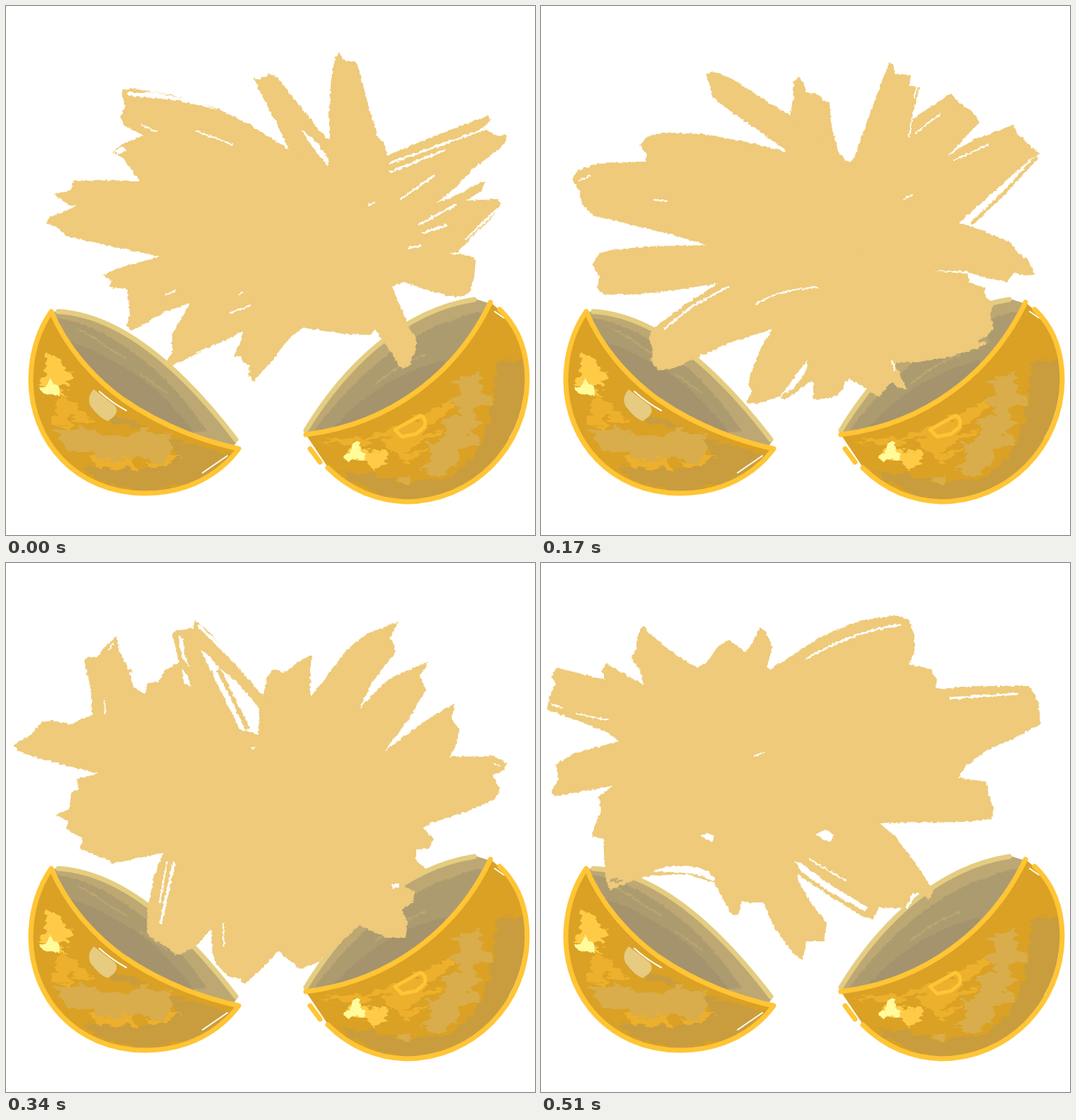
An HTML page for the animation above (0.68 s loop, 748 by 748 pixels).

```html
<!DOCTYPE html>
<html lang="en">
<head>
<meta charset="utf-8">
<title>Splash between two bowls</title>
<style>
html, body { margin: 0; width: 100%; height: 100%; overflow: hidden; background: #fff; }
svg { display: block; width: 100%; height: 100%; }
.line { fill: none; stroke: #ffc535; stroke-width: 7; stroke-linecap: round; stroke-linejoin: round; }
.back { stroke: #e4cd80; }
.thin { stroke-width: 5; }
.gold { fill: #daa124; } .dusk { fill: #c99d3e; } .tan { fill: #d9ad4b; }
.amber { fill: #edb02c; } .glow { fill: #ffcb47; } .spark { fill: #fffb9b; }
.in1 { fill: #bda873; } .in2 { fill: #ad9b70; } .in3 { fill: #a4936d; }
.ink { fill: #eeca7a; } .gap { fill: none; stroke: #fff; stroke-linecap: round; }
.hole { fill: #fff; }
</style>
</head>
<body>
<svg viewBox="0 0 748 748">
<defs>
  <filter id="rough" filterUnits="userSpaceOnUse" x="0" y="0" width="748" height="748" color-interpolation-filters="sRGB">
    <feTurbulence type="fractalNoise" baseFrequency=".2" numOctaves="2" seed="4"/>
    <feDisplacementMap in="SourceGraphic" scale="5" xChannelSelector="R" yChannelSelector="G"/>
  </filter>
  <filter id="streaky" filterUnits="userSpaceOnUse" x="0" y="0" width="748" height="748" color-interpolation-filters="sRGB">
    <feTurbulence type="fractalNoise" baseFrequency=".05 .12" numOctaves="3" seed="9"/>
    <feDisplacementMap in="SourceGraphic" scale="20" xChannelSelector="R" yChannelSelector="G"/>
  </filter>
  <path id="shapeL" d="M64 432C84 480 121 524 165 556C213 589 270 613 329 626C304 660 258 690 195 689C100 688 36 617 35 530C35 490 47 456 64 432Z"/>
  <path id="shapeR" d="M424 606C540 592 636 522 685 419L698 430C724 454 737 487 737 529C736 624 660 701 565 701C525 700 486 684 455 652Z"/>
  <path id="innerL" d="M68 432C158 437 246 512 327 615L320 625C210 606 110 555 68 432Z"/>
  <path id="innerR" d="M422 604C478 511 562 428 663 414L682 420C645 525 555 604 422 606Z"/>
  <clipPath id="bodyL"><use href="#shapeL"/></clipPath>
  <clipPath id="bodyR"><use href="#shapeR"/></clipPath>
  <clipPath id="cupL"><use href="#innerL"/></clipPath>
  <clipPath id="cupR"><use href="#innerR"/></clipPath>
</defs>

<use href="#innerL" class="in1"/>
<g clip-path="url(#cupL)"><g filter="url(#rough)">
  <path class="in2" d="M68 440C150 452 230 520 284 601L230 605L120 560Z"/>
  <path class="in3" d="M80 471C105 480 125 486 145 499C190 520 231 555 266 604L200 599L110 530Z"/>
  <path d="M101 456C130 470 146 487 171 499M190 520L228 548" fill="none" stroke="#bda873" stroke-width="2"/>
</g></g>
<path class="line back" d="M74 432C160 437 244 507 325 613"/>

<use href="#shapeL" class="gold"/>
<g clip-path="url(#bodyL)"><g filter="url(#streaky)">
  <path class="dusk" d="M118 565L175 585L235 612L315 632L290 665L200 688L130 672L110 650L190 653L245 637L215 600L150 590Z"/>
  <path class="amber" d="M75 550L105 567L125 590L85 580L98 602L65 590ZM120 636L172 630L185 655L130 654ZM195 646L250 632L215 656Z"/>
  <path class="tan" d="M68 601L110 596L135 608L180 604L190 598L232 606L236 626L222 646L184 638L148 645L120 629L88 627Z"/>
  <path class="glow" d="M57 492L72 490L82 513L95 520L90 537L75 535L88 554L68 548L45 535L55 520Z"/>
</g>
<path class="spark" filter="url(#rough)" d="M62 526L68 535L75 537L76 552L65 549L53 548L47 540L57 538Z"/>
<path d="M124 542L154 565Q160 573 152 581L144 587Q132 583 119 565Q114 553 124 542Z" fill="#e6cb80"/>
<path class="gap" stroke-width="2" d="M132 545Q150 561 170 572M40 561Q47 595 66 622M278 660L313 636"/>
</g>
<use href="#shapeL" class="line"/>

<use href="#innerR" class="in1"/>
<g clip-path="url(#cupR)"><g filter="url(#rough)">
  <path class="in2" d="M435 601C490 528 567 453 675 431L650 500L560 585Z"/>
  <path class="in3" d="M460 601C490 562 545 520 622 500L600 550L530 595Z"/>
  <path d="M522 535C545 515 570 502 593 493M625 447L655 433" fill="none" stroke="#bda873" stroke-width="2"/>
</g></g>
<path class="line back" d="M424 600C478 511 560 431 662 415"/>

<use href="#shapeR" class="gold"/>
<g clip-path="url(#bodyR)"><g filter="url(#streaky)">
  <path class="dusk" d="M694 505L740 498L735 590L680 670L610 705L535 697L465 655L515 661L560 675L620 670L661 640L685 580Z"/>
  <path class="amber" d="M438 616L520 607L560 592L550 607L485 620ZM575 585L635 556L620 580L585 604L622 598L560 633L602 622L565 645L530 620Z"/>
  <path class="tan" d="M632 529L672 516L670 540L688 560L660 570L672 590L655 600L670 618L640 630L642 647L610 668L585 650L605 638L594 620L628 604L615 590L646 570L625 560L648 547ZM550 668L574 665L568 677Z"/>
  <path class="glow" d="M478 638L492 623L512 628L542 632L535 646L524 657L509 648Z"/>
</g>
<path class="spark" filter="url(#rough)" d="M491 617L500 616L501 628L509 635L506 642L491 640L483 646L477 637L487 630Z"/>
<path class="gap" stroke-width="2" d="M691 432L704 441M733 552Q728 585 712 612M470 667Q500 691 532 697M600 697L640 685"/>
</g>
<path class="line" d="M424 606C540 592 636 522 685 419M698 429C724 454 737 487 737 529C736 624 660 701 565 701C525 700 486 684 455 653M430 626L444 645"/>
<path class="line thin" d="M550 599L586 579Q595 583 592 595L580 605L560 609Z"/>

<g class="splash" filter="url(#rough)">
  <path class="ink" d="M380 460L400 203 385 170 362 127 350 101 358 104 372 96 384 101 405 128 440 172 457 190 457 150 460 100 466 72 472 65 476 76 496 80 503 105 515 150 526 186 537 197 538 212 600 186 682 155 685 161 675 172 690 182 707 183 705 195 690 208 660 230 636 256 608 279 640 264 678 247 672 262 650 275 695 273 700 280 690 296 665 320 638 348 625 350 655 352 664 360 662 385 655 406 645 411 625 410 590 400 562 390 546 397 560 430 570 455 580 470 580 485 570 508 562 513 555 508 545 490 530 470 522 457 515 465 480 464 440 458 420 455Z"/>
  <path class="ink" d="M425 215L400 203 345 168 300 145 235 126 175 116 163 120 168 140 162 158 168 170 195 183 165 195 150 207 165 215 180 235 188 247 130 246 95 248 92 260 68 266 90 282 100 283 65 297 56 306 75 315 85 325 150 340 218 354 190 362 160 370 136 381 150 388 145 398 172 400 175 435 170 452 178 459 200 447 225 432 260 420 235 465 235 490 225 505 228 511 270 492 305 475 335 460 330 480 322 495 332 495 335 505 345 508 343 520 349 532 375 503 400 470 425 452Z"/>
  <path class="hole" d="M417 174L439 192 457 218 455 226 438 207ZM170 122L210 122 270 135 300 147 240 133 175 127ZM152 207L164 198 172 205 158 209Z"/>
  <path class="gap" stroke-width="3" d="M543 222L677 174M543 235L620 204M558 273L605 240M615 275L650 260M584 309L636 281M590 321L622 310M570 342L586 339M650 330L694 288"/>
  <path class="gap" stroke-width="2" d="M192 168L212 178M270 177L320 196M514 281L522 277M225 408L240 403M318 434L346 423M329 408L335 405M270 490L300 478M690 213L707 196"/>
</g>

<g class="splash" filter="url(#rough)">
  <path class="ink" d="M360 480L345 185 352 155 357 130 357 108 365 100 373 112 375 122 392 125 400 135 408 136 410 165 420 205 432 220 442 218 455 180 475 125 492 80 498 82 500 95 522 98 520 112 535 115 528 145 524 160 580 124 590 135 610 150 617 158 620 165 605 180 575 212 610 190 668 168 673 180 682 188 697 203 706 208 690 218 592 306 630 320 665 335 675 350 688 358 699 380 685 381 668 377 660 390 630 385 600 375 555 374 603 379 606 392 627 398 629 413 641 420 635 435 640 455 628 470 635 475 615 485 575 497 530 504 495 504 505 515 517 542 505 540 495 530Z"/>
  <path class="ink" d="M410 210L352 155 320 135 270 103 245 93 233 95 240 115 243 130 280 157 330 192 352 208 300 194 230 181 175 179 150 185 140 197 150 210 147 220 80 223 52 232 44 245 55 262 58 280 75 297 110 305 180 322 235 338 150 340 100 345 82 350 73 365 82 382 80 400 88 408 130 408 190 402 250 392 200 425 160 455 152 470 158 485 155 500 165 515 188 512 225 495 270 475 327 457 310 485 297 520 293 535 298 545 290 560 305 563 337 552 345 557 375 535 385 530 385 556 405 555 420 550 436 527 450 535 478 553 500 525Z"/>
  <path d="M609 308L655 264 701 214" fill="none" stroke="#eeca7a" stroke-width="5"/>
  <path class="hole" d="M577 211L596 191 617 168 611 185ZM337 553L360 523 377 500 374 517 357 541ZM422 551L431 530 442 537 432 549Z"/>
  <path class="gap" stroke-width="3" d="M175 456L215 424 265 397"/>
  <path class="gap" stroke-width="2" d="M303 422Q340 399 392 398M55 246L70 240M160 274L178 276M513 273L525 267M520 186L524 160M530 180L565 152M585 218L632 196M481 104L491 83M527 130L532 114M497 502L500 515"/>
  <path d="M619 475L632 468M622 471L634 475" fill="none" stroke="#b8a473" stroke-width="4"/>
</g>

<g class="splash" filter="url(#rough)">
  <path class="ink" d="M340 500L340 238 357 242 362 192 370 160 378 150 392 156 400 150 413 140 432 130 430 160 430 190 450 165 480 125 510 100 555 83 543 105 552 125 540 140 520 165 500 205 540 165 560 155 597 140 585 160 594 180 570 220 535 266 590 225 635 198 630 222 642 235 635 260 627 274 690 273 708 283 704 293 688 300 698 320 690 335 650 352 600 368 590 375 605 390 598 404 580 405 580 422 595 432 580 445 560 455 578 465 575 480 560 490 568 510 565 530 540 530 500 513 480 530 440 565 415 574 385 548Z"/>
  <path class="ink" d="M390 300L365 190 330 150 285 95 268 82 265 92 240 96 235 100 245 140 225 152 215 168 200 170 198 180 175 150 160 125 157 103 140 118 130 132 110 135 120 180 122 215 90 228 65 223 50 225 35 243 10 258 20 268 80 285 130 298 100 305 103 320 92 325 90 348 70 356 88 365 85 375 108 390 105 405 145 420 150 425 222 410 210 440 200 490 199 520 205 530 230 545 240 555 265 545 290 518 292 555 300 570 315 585 330 588 337 596 360 575 388 546Z"/>
  <path class="hole" d="M275 123L286 130 304 150 328 170 358 205 357 242 330 235 304 181ZM174 154L186 157 199 178 196 185 180 175ZM244 102L250 108 252 126 260 148 248 133ZM248 149L256 158 261 175 252 170ZM546 455L555 452 556 458 548 460Z"/>
  <path d="M300 150L319 188 342 235" fill="none" stroke="#eeca7a" stroke-width="6"/>
  <path class="gap" stroke-width="4" d="M273 89L326 142M237 425L219 509"/>
  <path class="gap" stroke-width="2" d="M228 423L217 480M307 510L308 540M139 195L140 212M348 262L352 261M600 369L655 354M691 285L698 287M160 123L174 149M146 122L151 114"/>
</g>

<g class="splash" filter="url(#rough)">
  <path class="ink" d="M260 440L260 130 265 110 274 115 280 132 288 130 300 110 310 91 318 98 327 118 320 145 314 157 340 140 400 102 450 82 500 74 520 80 528 100 528 125 520 143 550 150 560 165 558 178 620 174 690 174 698 185 704 200 706 228 670 247 630 265 600 288 590 303 630 310 633 328 640 345 638 362 600 366 480 368 500 385 530 425 555 463 548 476 532 465 515 487 495 488 478 487 470 503 455 500 410 472 362 440 368 456 385 485 404 510 400 535 375 535 370 562 355 550 330 515 314 480 290 475Z"/>
  <path class="ink" d="M330 155L274 115 265 110 250 118 235 140 222 148 210 142 175 118 152 98 145 89 138 98 135 120 127 135 140 150 145 172 110 152 92 142 86 152 90 165 50 155 22 148 15 160 20 170 12 190 8 208 50 222 95 240 110 252 50 268 20 285 25 305 15 322 20 330 102 315 82 330 85 350 78 365 72 387 88 390 90 430 92 450 97 462 115 455 140 445 160 442 205 440 245 452 255 470 270 498 280 497 283 478 295 480 330 480Z"/>
  <path class="hole" d="M157 436L179 429 208 428 233 434 247 446 244 450 220 440 190 437ZM225 386L235 382 245 385 242 395 234 391ZM388 384L402 376 415 385 409 394 397 390ZM359 421L370 426 406 453 462 487 458 493 408 465 366 435ZM516 487L526 466 530 468 519 488Z"/>
  <path class="gap" stroke-width="3" d="M376 135Q435 99 508 87M579 191L674 185"/>
  <path class="gap" stroke-width="2" d="M302 273L316 267M380 419L430 449M50 213L94 222M16 200L30 205M364 448L378 472"/>
  <path d="M99 450L108 446M104 451L116 449" fill="none" stroke="#b8a473" stroke-width="3"/>
</g>
</svg>
<script>
const splashes = document.querySelectorAll('.splash');
const HOLD = 170;
let shown = -1;

function draw(now) {
  const pose = Math.floor(now / HOLD) % splashes.length;
  if (pose !== shown) {
    splashes.forEach((g, i) => { g.style.display = i === pose ? '' : 'none'; });
    shown = pose;
  }
  requestAnimationFrame(() => draw(performance.now() - start));
}

const start = performance.now();
draw(0);
</script>
</body>
</html>
```
